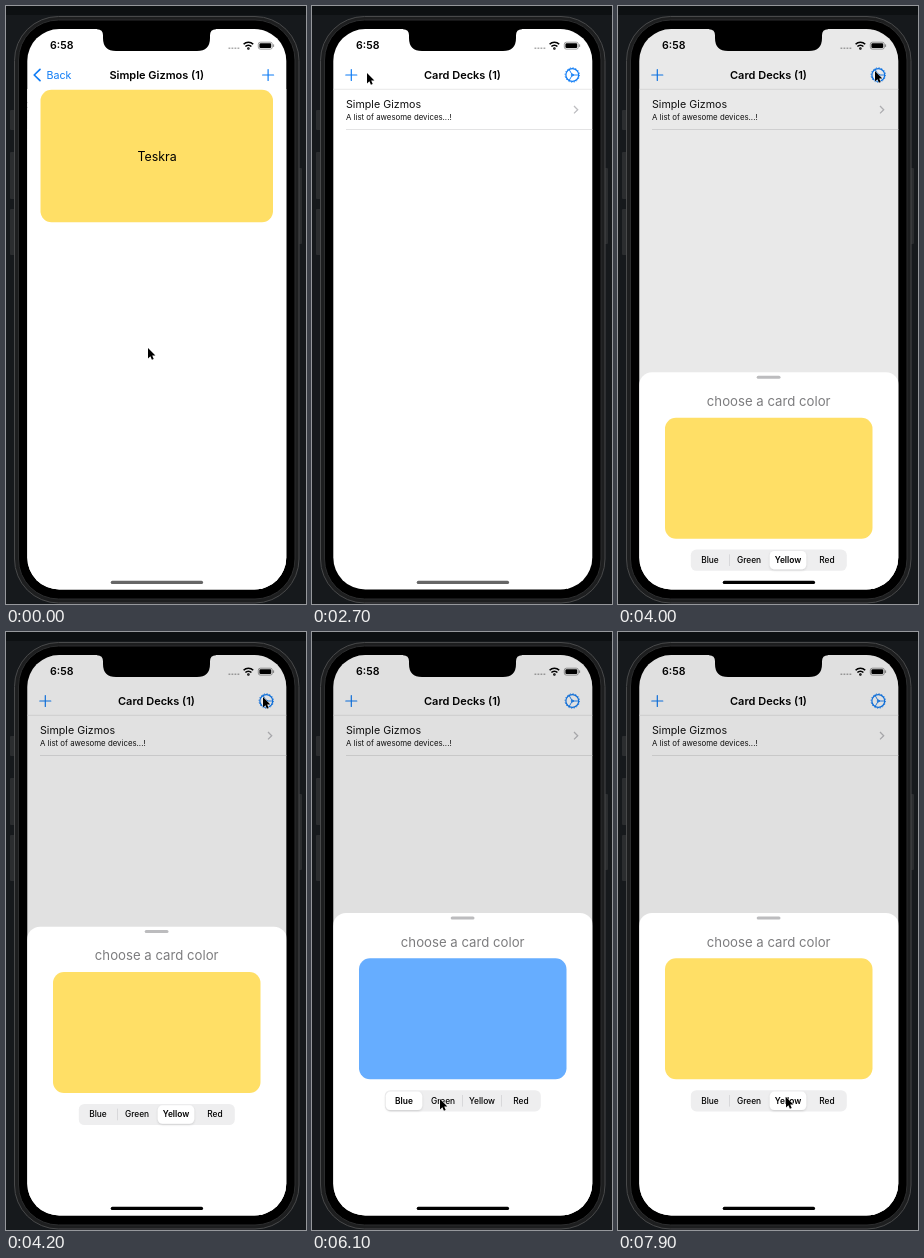
An HTML page for the animation above (8 s loop, 300 px wide and 598 px high).

```html
<!DOCTYPE html>
<html lang="en">
<head>
<meta charset="utf-8">
<title>Card decks</title>
<style>
  html, body { margin: 0; width: 100%; height: 100%; overflow: hidden; background: #16191c; }
  svg { display: block; width: 100vw; height: 100vh; }
  text { font-family: Inter, Roboto, "Liberation Sans", sans-serif; }
  .title { font-size: 11px; font-weight: 600; text-anchor: middle; }
  .line { fill: none; stroke: #0f7cf5; stroke-linecap: round; stroke-linejoin: round; }
  .seg { font-size: 8.4px; font-weight: 500; text-anchor: middle; }
</style>
</head>
<body>
<svg viewBox="0 0 300 598">
  <defs>
    <clipPath id="screen"><rect x="21.3" y="23" width="259" height="560.5" rx="32"/></clipPath>
    <filter id="shadow" x="-20%" y="-20%" width="140%" height="150%">
      <feDropShadow dx="0" dy="1" stdDeviation="1.2" flood-opacity=".15"/>
    </filter>
  </defs>

  <!-- phone body -->
  <rect width="300" height="598" fill="#16191c"/>
  <rect width="300" height="9" fill="#0d1012"/>
  <g fill="#2b2d2f">
    <rect x="4" y="104" width="5" height="20" rx="1"/>
    <rect x="4" y="146" width="5" height="47" rx="1"/>
    <rect x="4" y="203" width="5" height="46" rx="1"/>
    <rect x="292" y="162" width="4" height="76" rx="1"/>
  </g>
  <rect x="8.5" y="10.5" width="284.5" height="586.5" rx="44" fill="#1d1e1f" stroke="#48494a"/>
  <rect x="12.5" y="14" width="276.5" height="579" rx="40" fill="#000" stroke="#2c2d2e"/>

  <g clip-path="url(#screen)">
    <rect x="21" y="23" width="260" height="561" fill="#fff"/>

    <g id="list">
      <text x="34" y="102" font-size="10.7" fill="#111">Simple Gizmos</text>
      <text x="34" y="114" font-size="7.85" fill="#111">A list of awesome devices...!</text>
      <path d="M262 100l3.7 3.7-3.7 3.7" fill="none" stroke="#bdbdc0" stroke-width="1.3"/>
      <path d="M34 123.5H281" stroke="#dcdcde" stroke-width=".8"/>
    </g>

    <g id="cards">
      <rect x="21" y="83" width="260" height="501" fill="#fff"/>
      <rect x="34.5" y="83.7" width="232.5" height="132.5" rx="11" fill="#ffdf66"/>
      <text x="151" y="154.5" font-size="12.4" text-anchor="middle">Teskra</text>
    </g>

    <g id="listNav">
      <path d="M21 83.3H281" stroke="#dedee0" stroke-width=".7"/>
      <path class="line" stroke-width="1.2" d="M33.8 69h11M39.3 63.5v11"/>
      <text id="listTitle" class="title" y="73">Card Decks (1)</text>
      <g class="line" transform="translate(260.3 69)">
        <circle r="6.4" stroke-width="1.2"/>
        <circle r="7.2" stroke-width=".9" stroke-dasharray="1.3 1.528" stroke-linecap="butt"/>
        <path d="M0 0H6M0 0L-3 -5.2M0 0L-3 5.2" stroke-width=".9"/>
        <circle r="1.1" stroke-width=".8"/>
      </g>
    </g>

    <g id="cardsNav">
      <path class="line" stroke-width="1.7" d="M34 63.3L28.2 69 34 74.7"/>
      <text x="40.5" y="73" font-size="10.7" fill="#0f7cf5">Back</text>
      <text id="cardsTitle" class="title" y="73">Simple Gizmos (1)</text>
      <path class="line" stroke-width="1.2" d="M256.6 69h11M262.1 63.5v11"/>
    </g>

    <!-- status bar -->
    <text x="44" y="43.3" font-size="10.6" font-weight="600">6:58</text>
    <path d="M222.5 42.3h11" stroke="#aaa" stroke-width="1.6" stroke-dasharray="1.8 1.2"/>
    <g fill="none" stroke="#000" stroke-width="1.6">
      <path d="M237.6 38.3a6.6 6.6 0 0 1 9.6 0M239.4 40.5a4.1 4.1 0 0 1 6 0"/>
      <circle cx="242.4" cy="42.5" r=".5"/>
    </g>
    <rect x="252.3" y="36.2" width="14" height="6.9" rx="2" fill="none" stroke="#888" stroke-width=".8"/>
    <rect x="253.4" y="37.3" width="11.8" height="4.7" rx="1.1"/>
    <path d="M267.6 38.4v2.5" stroke="#888"/>

    <rect id="dim" x="21" y="23" width="260" height="561"/>

    <g id="sheet">
      <rect x="21" y="281" width="260" height="340" rx="13" fill="#fff"/>
      <rect x="138.7" y="284.4" width="23.8" height="3" rx="1.5" fill="#bcbcbe"/>
      <text x="150.7" y="314.5" font-size="13.2" fill="#7c7c7e" text-anchor="middle">choose a card color</text>
      <rect id="swatch" x="47" y="326.3" width="207.5" height="121" rx="11"/>
      <rect x="72.8" y="458.2" width="156" height="21.2" rx="5.6" fill="#eeeeef"/>
      <g id="bars" stroke="#d2d2d5" stroke-width=".8"></g>
      <rect id="pill" x="-18.2" y="459.6" width="36.4" height="18.4" rx="4.6" fill="#fff" filter="url(#shadow)"/>
      <g id="labels"></g>
    </g>

    <rect id="home" x="104.7" y="574.8" width="92.4" height="3.2" rx="1.6"/>
  </g>

  <path d="M91 22v1.2q6 0 6 6V32q0 13 13 13h81q13 0 13-13v-2.8q0-6 6-6V22z"/>
  <path id="cursor" d="M0 0V10.4L2.4 8.2 3.9 11.8 5.7 11 4.2 7.6H7.4z" stroke="#fff" stroke-width=".9" paint-order="stroke"/>
</svg>

<script>
const LOOP = 8000;
const $ = id => document.getElementById(id);
const clamp = v => Math.max(0, Math.min(1, v));
const ramp = (t, a, b) => clamp((t - a) / (b - a));
const smooth = u => u * u * (3 - 2 * u);
const mix = (a, b, u) => a + (b - a) * u;
const move = (id, x, y) => $(id).setAttribute('transform', `translate(${x} ${y})`);
const set = (id, name, value) => $(id).setAttribute(name, value);

const options = [['Blue', '#66adff'], ['Green', '#85dd9b'], ['Yellow', '#ffdf66'], ['Red', '#ff8983']];
const segX = i => 92 + 39 * i;

const add = (parent, tag, attrs, text = '') => {
  const el = document.createElementNS('http://www.w3.org/2000/svg', tag);
  for (const name in attrs) el.setAttribute(name, attrs[name]);
  el.textContent = text;
  return $(parent).appendChild(el);
};
const labels = options.map(([name], i) => add('labels', 'text', { class: 'seg', x: segX(i), y: 471.8 }, name));
const bars = [0, 1, 2].map(i => add('bars', 'path', { d: `M${segX(i) + 19.5} 463v11.6` }));

// Segment picks: time, option
const picks = [[5300, 0], [6400, 1], [7400, 2]];

// Cursor strokes: start, end, bend point, end point
const strokes = [
  [950, 1935, 145, 176, 55, 67],
  [2700, 3300, 150, 135, 257, 65],
  [4350, 4950, 185, 275, 97, 468],
  [5750, 6100, 112, 469, 128, 467],
  [6700, 7050, 148, 467, 168, 465],
];

function cursorAt(t) {
  let x = 142, y = 342;
  for (const [a, b, cx, cy, ex, ey] of strokes) {
    const u = smooth(ramp(t, a, b));
    const bend = (p, c, e) => mix(mix(p, c, u), mix(c, e, u), u);
    x = bend(x, cx, ex);
    y = bend(y, cy, ey);
  }
  return [x, y];
}

function draw(t) {
  // back to the list
  const pop = 1 - (1 - ramp(t, 1980, 2500)) ** 3;
  move('list', -78 * (1 - pop), 0);
  move('cards', 260 * pop, 0);
  set('listNav', 'opacity', pop);
  set('cardsNav', 'opacity', 1 - pop);
  set('listTitle', 'x', mix(50, 150.5, pop));
  set('cardsTitle', 'x', mix(150.7, 250, pop));

  // sheet rises on a critically damped spring
  const w = 0.0117 * Math.max(0, t - 3785);
  const rise = t > 4450 ? 1 : 1 - (1 + w) * Math.exp(-w);
  move('sheet', 0, 303 * (1 - rise));
  set('dim', 'opacity', 0.122 * rise);
  set('home', 'fill', rise > 0.05 ? '#000' : '#666');

  // segmented control
  let place = 2, chosen = 2;
  for (const [start, option] of picks) {
    place = mix(place, option, smooth(ramp(t, start + 30, start + 300)));
    if (t >= start + 80) chosen = option;
  }
  move('pill', segX(place), 0);
  set('swatch', 'fill', options[chosen][1]);
  labels.forEach((el, i) => el.style.fontWeight = i === chosen ? 600 : 500);
  bars.forEach((el, i) => el.setAttribute('opacity', clamp(Math.abs(i + 0.5 - place) * 2 - 1)));

  move('cursor', ...cursorAt(t));
}

const begin = performance.now();
function tick() {
  draw((performance.now() - begin) % LOOP);
  requestAnimationFrame(tick);
}
tick();
</script>
</body>
</html>
```
